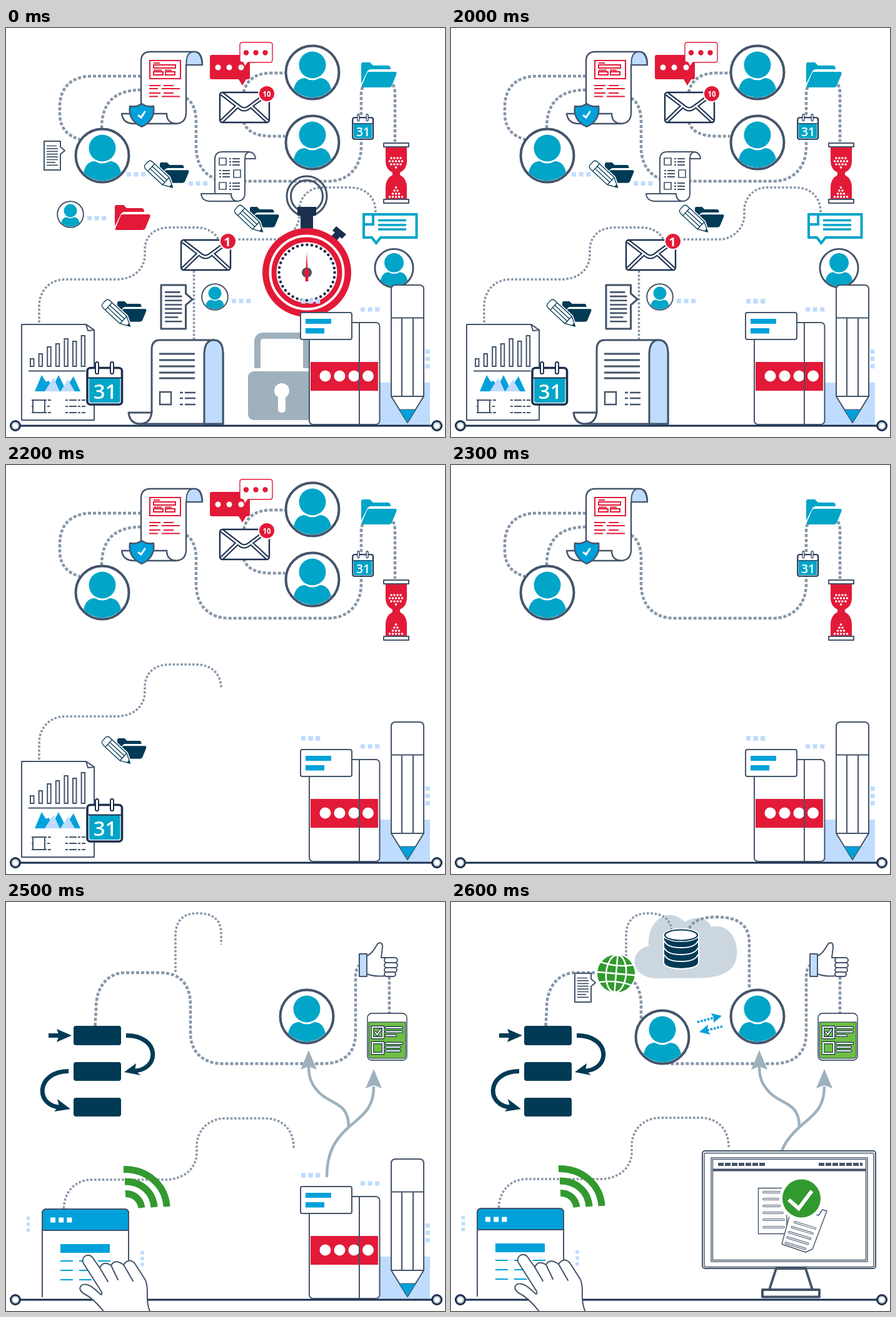
An HTML page that plays this animation: 702 px wide and 654 px high, repeating every 7.6 s.

```html
<!DOCTYPE html>
<html lang="en">
<head>
<meta charset="utf-8">
<title>Paperwork to digital</title>
<style>
html, body { margin: 0; width: 100%; height: 100%; overflow: hidden; background: #fff; }
svg { display: block; width: 100vw; height: 100vh; }
text { font-family: "Open Sans", sans-serif; text-anchor: middle; fill: #fff; }
.o { fill: #fff; stroke: #44546a; stroke-width: 2; stroke-linejoin: round; }
.n { fill: #fff; stroke: #1b2f4f; stroke-width: 2.4; stroke-linejoin: round; }
.l { fill: none; stroke: #44546a; stroke-width: 2; }
.w { fill: none; stroke: #fff; stroke-width: 2; stroke-linecap: round; }
.dot { fill: none; stroke: #8696a8; stroke-width: 4.5; stroke-dasharray: 5 3; }
.fine { stroke-width: 3.5; stroke-dasharray: 3.5 2.8; }
.sq { fill: none; stroke: #bfdcff; stroke-width: 7; stroke-dasharray: 7 4.6; }
.sm { stroke-width: 5.5; stroke-dasharray: 5.5 4; }
.red { fill: #e21a38; }
.redl { fill: none; stroke: #e21a38; stroke-width: 2; }
.teal { fill: #00a5c8; }
.blue { fill: #00a1db; }
.pale { fill: #bfdcff; }
.dark { fill: #003a55; }
.navy { fill: #1b2f4f; }
.gray { fill: #9eb1bd; }
.green { fill: #32992f; }
</style>
</head>
<body>
<svg viewBox="0 0 702 654">
<defs>
  <g id="person">
    <circle class="o" r="42.5" style="stroke-width:4"/>
    <circle class="teal" cy="-12" r="21.5"/>
    <path class="teal" d="M-30 27Q-26 9 -12 9Q0 16 12 9Q26 9 30 27A40.5 40.5 0 0 1 -30 27Z"/>
  </g>
  <g id="folder" fill="currentColor">
    <path d="M0 34V3Q0 0 3 0H14L19 5H43Q47 5 47 11H16Q11 11 9 16Z"/>
    <path d="M13 15H54Q58 15 56 20L49 37Q48 40 44 40H2Q0 40 1 37L9 18Q10 15 13 15Z"/>
  </g>
  <path id="pencil" d="M-1-8H35L50 0L35 8H-1Q-7 8-7 3V-3Q-7-8-1-8ZM35-8V8M3-8V8M3-2.5H35M3 2.5H35"/>
  <g id="edit">
    <use href="#folder" transform="translate(246 215) scale(.82)" color="#003a55"/>
    <g transform="translate(230 221) rotate(43)" fill="#fff" stroke-linejoin="round">
      <use href="#pencil" stroke="#fff" stroke-width="4.5"/>
      <use href="#pencil" stroke="#003a55" stroke-width="1.3"/>
      <path d="M45-2.500L50 0L45 2.500Z" class="dark"/>
    </g>
  </g>
  <g id="note">
    <path class="o" d="M0 0H26V9L33 15L26 21V46H0Z"/>
    <path class="l" style="stroke-width:1.7" d="M4 7.500H20M4 11.900H22M4 16.300H22M4 20.700H22M4 25.100H22M4 29.500H22M4 33.900H18M4 38.300H22"/>
  </g>
  <g id="calendar">
    <rect class="n" x=".5" y=".5" width="55.500" height="58.500" rx="5" style="stroke-width:3.6"/>
    <path class="teal" d="M3.500 17H53V53Q53 56 50 56H6.500Q3.500 56 3.500 53Z"/>
    <path d="M2 16.500H55" stroke="#1b2f4f" stroke-width="2"/>
    <rect class="n" x="13.500" y="-9" width="5" height="19" rx="2.5" style="stroke-width:2"/>
    <rect class="n" x="37.500" y="-9" width="5" height="19" rx="2.5" style="stroke-width:2"/>
    <text x="29" y="50" font-size="33" font-weight="600">31</text>
  </g>
  <path id="folds" d="M345 105L375 128Q381 132 387 128L418 105M345 149L370 125M418 149L392 125"/>
  <g id="envelope" fill="none">
    <rect class="n" x="342" y="103" width="79" height="48" rx="4"/>
    <use href="#folds" stroke="#1b2f4f" stroke-width="7"/>
    <use href="#folds" stroke="#fff" stroke-width="2.8"/>
    <circle class="red" cx="417" cy="105" r="13" stroke="#fff" stroke-width="2"/>
  </g>
  <path id="tasks" d="M595 200H612V217H595ZM595 225H612V242H595ZM617 201H642M617 207.5H642M617 213.5H632M617 226H642M617 232H639M617 238H639"/>
  <path id="tick" d="M599.5 208L602.5 212L608 204"/>
  <path id="rows" d="M500 464H526M500 475H526M500 486H526M500 497H530M500 508H532M500 520H532"/>
  <path id="tilted" d="M6-4H40M4 5H38M2 14H37M2 23H36M2 32H34"/>
</defs>

<!-- dotted routes -->
<path class="dot" data-on="0-5" d="M216 77H137C105 77 86 95 86 126V140Q88 170 118 178M216 99Q153 99 153 160M288 112Q304 122 304 150V190C304 225 325 245 357 245H515C548 245 568 222 568 190V105Q570 79 595 79Q622 79 622 105V182"/>
<path class="dot" data-on="0-3" d="M380 103Q387 72 425 72H446M380 150Q387 173 425 173H446"/>
<path class="dot fine" data-on="0-3" d="M53 471V445C53 420 70 402 95 402H175C205 402 222 385 222 362V355C222 335 235 319 262 319H303C330 319 344 335 344 358"/>
<path class="dot fine" data-on="0-1" d="M359 338H430C450 338 469 320 469 300V290C470 270 485 255 505 255H550C575 255 591 270 591 295"/>
<path class="dot fine" data-on="0-2" d="M300.5 388V498"/>

<!-- people, chat and mail -->
<use href="#person" x="154" y="204" data-on="0-5"/>
<g data-on="0-3">
  <use href="#person" x="490" y="71"/>
  <use href="#person" x="490" y="183"/>
  <path class="red" d="M329 43H387Q390 43 390 46V79Q390 82 387 82H384L378 92L372 82H329Q326 82 326 79V46Q326 43 329 43Z"/>
  <g fill="#fff"><circle cx="339" cy="63" r="4.5"/><circle cx="357" cy="63" r="4.5"/><circle cx="376" cy="63" r="4.5"/></g>
  <path d="M378 23H422Q426 23 426 27V51Q426 55 422 55H387L382 62L379 55H378Q374 55 374 51V27Q374 23 378 23Z" fill="#fff" stroke="#e21a38" stroke-width="1.4"/>
  <g class="red"><circle cx="384" cy="39.5" r="4.2"/><circle cx="399.5" cy="39.5" r="4.2"/><circle cx="414.5" cy="39.5" r="4.2"/></g>
  <use href="#envelope"/>
  <text x="417" y="109.5" font-size="11.5" font-weight="bold">10</text>
</g>

<!-- certified scroll -->
<g data-on="0-5">
  <path class="o" style="stroke-width:2.4" d="M301 38H231Q216 38 216 53V137H185Q187 153 205 153H272Q288 152 288 135V59H314Q314 38 301 38Z"/>
  <path class="o" style="fill:#bfdcff" d="M288.5 59V52Q290 38 301 38Q313 39 313.5 59Z"/>
  <path class="l" style="stroke-width:2.4" d="M205 137H257Q257 152 272 153"/>
  <path class="redl" d="M230 52H279V81H230ZM236 59H271V64H236ZM236 70H251V75H236ZM255 70H270V75H255ZM236 56H246M236 67.5H249M254 67.5H265"/>
  <path class="redl" d="M229 92H247M252 92H268M229 97H243M249 97H278M229 104H247M252 104H268M229 109.5H243M249 109.5H278"/>
  <path class="o" style="fill:#00a1db;stroke-width:2.4" d="M198 125Q209 127 217 121Q225 127 236 125Q239 148 217 158Q195 148 198 125Z"/>
  <path class="w" style="stroke-width:3" d="M212 140L216 143L222 134"/>
</g>

<g data-on="0-4">
  <use href="#folder" x="568" y="55" color="#00a5c8"/>
  <use href="#calendar" transform="translate(554 143) scale(.59)"/>
  <path class="red" d="M607 190H641V213Q641 226 630 231V235Q641 241 641 255V274H607V255Q607 241 618 235V231Q607 226 607 213Z"/>
  <path class="o" d="M604 184H644V190H604ZM604 274H644V280H604Z"/>
  <path class="w" style="stroke-width:3.6;stroke-dasharray:0 5" d="M616 208h16.1M613.5 213h20.1M616 218h16.1M623.5 223h.1M623.5 255h.1M621 260h5.1M618.5 265h10.1M613.5 270h20.1"/>
</g>

<!-- loose paperwork -->
<g data-on="0-0">
  <use href="#note" x="61" y="181"/>
  <use href="#person" transform="translate(103 298) scale(.49)"/>
  <path class="sq" d="M130 304h30.2"/>
  <use href="#folder" x="174" y="283" color="#e21a38"/>
</g>
<g data-on="0-2">
  <path class="sq" d="M193 234h30.2M292 248.5h30.2"/>
  <use href="#edit"/>
  <use href="#edit" x="144" y="71"/>
  <path class="o" d="M387 198H346Q334 198 334 210V265H312Q313 276 325 277H370Q382 276 382 264V209H399Q398 198 387 198Z"/>
  <path class="l" d="M382 209Q382 199 390 198M334 265H360Q360 276 370 277"/>
  <path class="l" style="stroke-width:1.7" d="M341 208H352V219H341ZM364 227H375V239H364ZM341 247H352V258H341Z"/>
  <path class="l" style="stroke-width:1.8;stroke-dasharray:3 2 12 9" d="M357 209h18M357 214h18M357 219h18M341 228h17M341 233h17M341 238h17M357 248h18M357 253h18M357 258h18"/>
  <use href="#envelope" x="-62" y="236"/>
  <text x="354" y="349" font-size="20" font-weight="bold">1</text>
</g>
<g data-on="0-1">
  <path d="M572 298H656.5V335H599L592 344L585 335H572ZM587 298V314H572" fill="#fff" stroke="#00a5c8" stroke-width="4"/>
  <path d="M595 307.5H640M595 315H640M595 322H640" stroke="#00a5c8" stroke-width="3.6"/>
  <use href="#person" transform="translate(620.5 384) scale(.72)"/>
</g>
<g data-on="0-2">
  <use href="#note" transform="translate(248 411) scale(1.52)"/>
  <use href="#person" transform="translate(334 430) scale(.49)"/>
  <path class="sq" d="M361 436.5h30.2"/>
  <path class="o" style="stroke-width:3" d="M332 499H246Q233 499 233 514V615H196Q198 633 215 633H347V520Q346 499 332 499Z"/>
  <path class="o" style="fill:#bfdcff;stroke-width:3" d="M317 633V520Q318 499 332 499Q347 499 347 520V633Z"/>
  <path class="l" style="stroke-width:3" d="M233 613Q232 632 215 633M245 521H302M245 531H302M245 541H302M245 551H302M245 560H302"/>
  <path class="l" style="stroke-width:2.4" d="M246 582H264V602H246Z"/>
  <path class="l" style="stroke-width:2.6;stroke-dasharray:5 3 20 9" d="M278 583h25M278 592h25M278 602h25"/>
</g>

<!-- report -->
<g data-on="0-3">
  <use href="#edit" x="-68" y="222"/>
  <path class="o" d="M25 474H128L141 483V627H25Z"/>
  <path class="o" d="M128 474L131 484L141 483Z"/>
  <g id="bars" class="l"></g>
  <path class="l" d="M36 548.5H127M43 595H62V615H43Z"/>
  <path class="l" style="stroke-width:1.8;stroke-dasharray:4 2 12 2" d="M41 595h31M41 605h1M66 605h6M41 615h31M95 595h32M95 605h32M95 615h32"/>
  <path class="blue" d="M46 581L57 555L64 566L68 564L75 573L84 555L94 575L97 581ZM92 581L108 557L119 581Z"/>
  <path class="pale" d="M62 581L76 559L86 581ZM87 581L99 562L110 581Z"/>
  <use href="#calendar" x="129.5" y="543"/>
</g>

<!-- padlock and stopwatch -->
<g data-on="0-0">
  <path d="M402 544V502Q402 492 412 492H470Q480 492 480 502V544" fill="none" stroke="#9eb1bd" stroke-width="10"/>
  <rect class="gray" x="387" y="549" width="110" height="78" rx="9"/>
  <circle cx="441" cy="580" r="12" fill="#fff"/><rect x="435" y="580" width="12" height="35" rx="5" fill="#fff"/>
  <g class="l" style="stroke-width:3"><circle cx="481" cy="269" r="32"/><circle cx="481" cy="269" r="25.5"/></g>
  <path class="navy" d="M466 286H496V300H491V322H471V300H466Z"/>
  <path class="navy" d="M528 317L544 330L537 337L534 334L527 342L519 334L526 327L522 324Z"/>
  <circle class="red" cx="481" cy="391" r="71"/>
  <circle class="w" cx="481" cy="391" r="58.5" style="stroke-width:4"/>
  <circle cx="481" cy="391" r="48.5" fill="#fff"/>
  <circle cx="481" cy="391" r="44.5" fill="none" stroke="#1b2f4f" stroke-width="4.6" stroke-linecap="round" stroke-dasharray="0 7.767"/>
  <circle cx="481" cy="391" r="8" fill="#44546a"/>
  <path class="red" d="M481 358L483.5 405H478.5Z"/><circle class="red" cx="481" cy="391" r="4.8"/>
</g>

<!-- password book, pencil and baseline -->
<g data-on="0-6">
  <path class="sq" d="M472 437h30.2M567 450h30.2M674 514v30.2"/>
  <rect class="pale" x="597" y="567" width="81" height="68"/>
</g>
<path d="M22 636H682" stroke="#1b2f4f" stroke-width="3"/>
<g class="n" style="stroke-width:3"><circle cx="15" cy="636" r="7.5"/><circle cx="689" cy="636" r="7.5"/></g>
<g stroke="#8696a8" fill="#fff"><circle cx="15" cy="636" r="5"/><circle cx="689" cy="636" r="5"/></g>
<g data-on="0-6">
  <rect class="o" x="485" y="471" width="112.5" height="163" rx="6"/>
  <rect class="red" x="487" y="534" width="108" height="46"/>
  <g fill="#fff"><circle cx="510.5" cy="556.5" r="9"/><circle cx="533.5" cy="556.5" r="9"/><circle cx="556.5" cy="556.5" r="9"/><circle cx="579" cy="556.5" r="9"/></g>
  <path class="l" d="M565 471V634"/>
  <rect class="o" x="471" y="455" width="82" height="43" rx="3"/>
  <path class="blue" d="M479 465H520V473H479ZM479 480H509V488.5H479Z"/>
  <path class="o" d="M616 589V418Q616 411 623 411H661Q668 411 668 418V589L642 631Z"/>
  <path class="l" d="M616 463.5H668M616 589H668M633 463V589M651 463V589"/>
  <path class="o" style="fill:#00a1db;stroke-width:1" d="M628.5 610H655.5L642 631Z"/>
  <path class="sq" d="M472 437h30.2"/>
</g>

<!-- digital side -->
<g data-on="6-7" data-shift="6:-9,0">
  <path data-on="7-7" fill="#ccd6de" d="M325 122C285 118 284 78 316 70C314 28 348 6 374 32C392 20 412 26 416 40C447 32 464 68 455 95Q446 120 402 121.500Z"/>
  <path class="dot" d="M151.5 198L153 170C153 135 172 113 200 113H255C290 113 304 135 304 165V210C304 240 325 258.5 355 258.5H515C545 258.5 568 245 568 210V122Q568 104 576 100M622 119V178"/>
  <path class="dot fine" d="M280 112V55Q280 18 315 18Q353 18 353 50V68"/>
  <path class="dot" data-on="7-7" d="M381 42Q390 24 425 24Q477 24 477 65V138"/>
  <g class="dark"><rect x="117" y="198" width="76" height="31" rx="4"/><rect x="117" y="256" width="76" height="30" rx="4"/><rect x="117" y="313" width="76" height="30" rx="4"/>
    <path d="M90 203L114 213.5L90 224L94 213.5ZM198 272L217 258L215 269L224 277ZM112 331L91 315L94 326L86 335Z"/></g>
  <path d="M77 213.5H95M201 213.5C256 213 256 270 212 270M109 270.5C55 271 56 328 97 328" fill="none" stroke="#003a55" stroke-width="7"/>
  <path d="M522 440C522 400 535 380 557 360C580 340 597 330 597 295M557 360C557 320 530 325 510 305C497 292 493 280 493 263" fill="none" stroke="#9eb1bd" stroke-width="4.5"/>
  <path class="gray" d="M493 237L506 268L493 263L480 268ZM597 267L610 298L597 293L584 298Z"/>
  <use href="#person" x="490" y="183"/>
  <path class="o" d="M586 86C596 83 600 70 604 66Q611 63 611 72L609 89H616V118Q598 120 586 115Z"/>
  <g class="o"><rect x="614" y="89" width="21" height="8" rx="4"/><rect x="614" y="97" width="21" height="8" rx="4"/><rect x="614" y="105" width="20" height="7.5" rx="3.7"/><rect x="614" y="112" width="18" height="7" rx="3.5"/></g>
  <rect class="o" style="fill:#bfdcff" x="574" y="83" width="12" height="36"/>
</g>
<g data-on="5-7" data-shift="5:2,2 6:-9,0">
  <rect class="n" style="stroke-width:1.3" x="587" y="178" width="63" height="75" rx="7"/>
  <path d="M589 192H648V246Q648 250 644 250H593Q589 250 589 246Z" fill="#6fbe44" stroke="#1b2f4f"/>
  <g fill="none" stroke-linecap="round">
    <use href="#tasks" stroke="#1b2f4f" stroke-width="4.4"/>
    <use href="#tasks" stroke="#fff" stroke-width="2.2"/>
    <use href="#tick" stroke="#1b2f4f" stroke-width="4"/>
    <use href="#tick" stroke="#fff" stroke-width="2"/>
  </g>
</g>

<g data-on="5-7" data-shift="5:16,3 6:16,1">
  <path class="dot fine" d="M76.5 489C77 465 92 443 122 443H238C268 443 289 425 289 400V390C289 362 310 345 335 345H398C425 345 444 362 444 392"/>
  <path d="M172 426.5C210 426 239 452 241 486M174 446C200 446 219 462 221 487M175 465.5C188 465 199 474 201 488" fill="none" stroke="#32992f" stroke-width="11"/>
  <path class="sq sm" d="M19.5 502v24.6M202 557v24.6"/>
  <path class="o" d="M42 631V497Q42 490 49 490H173Q180 490 180 497V631"/>
  <path class="o" style="fill:#00a1db" d="M42 524V497Q42 490 49 490H173Q180 490 180 497V524Z"/>
  <path d="M55 507.5h35" stroke="#fff" stroke-width="8" stroke-dasharray="8 5.2"/>
  <path class="blue" d="M71 546H150V560H71Z"/>
  <path d="M71 573h80M71 588h80M71 603h50" stroke="#00a1db" stroke-width="2.2" stroke-dasharray="20 10"/>
  <path class="o" d="M142 656C130 640 120 631 108 625C97 617 104 608 114 611C123 613 129 622 136 627Q139 626 136 621L108 577C103 567 115 559 122 567L134 584Q139 572 152 580Q158 569 172 579Q181 567 190 577L206 602Q210 608 210 625Q209 642 215 656Z"/>
  <path class="l" stroke-linecap="round" d="M134 584L147 606M152 580L163 603M172 579L187 605"/>
</g>

<g data-on="7-7">
  <g stroke="#fff" stroke-width="2">
    <path class="dark" d="M340 53V97Q342 106 368 107Q394 106 396 97V53Z"/>
    <path fill="none" d="M341 62Q345 73 368 73Q391 73 395 62M341 73Q345 84 368 84Q391 84 395 73M341 84Q345 95 368 95Q391 95 395 84"/>
    <ellipse cx="368" cy="53" rx="28" ry="10"/>
  </g>
  <ellipse cx="368" cy="53" rx="26" ry="8.5" fill="#fff" stroke="#003a55" stroke-width="2"/>
  <use href="#note" x="198" y="114"/>
  <g transform="translate(264 114.5) rotate(5)">
    <circle class="green" r="31" stroke="#fff" stroke-width="2"/>
    <path class="w" style="stroke-width:2.6" d="M0-30V30M-30 0H30M-25-16Q0-10 25-16M-25 16Q0 10 25 16"/>
    <ellipse class="w" style="stroke-width:2.6" rx="16" ry="30"/>
  </g>
  <use href="#person" x="338" y="216"/>
  <path d="M394 192L421 185M434 199L410 205" stroke="#00a1db" stroke-width="3.6" stroke-dasharray="3.5 2"/>
  <path class="blue" d="M433 182L416 178L420 185L420 193ZM397 208L411 196L410 205L415 212Z"/>

  <rect class="o" x="402" y="398" width="277" height="188" rx="4"/>
  <g class="l" style="stroke-width:1.4"><rect x="405" y="401.5" width="271" height="182" rx="2"/><rect x="416" y="409" width="250" height="166"/><rect x="418.5" y="411.5" width="245" height="161"/></g>
  <path class="l" style="stroke-width:4" d="M418 428.5H664"/>
  <path class="l" style="stroke-width:5;stroke-dasharray:9 2" d="M427 419.5H503M588 419.5H658"/>
  <path class="o" style="stroke-width:4" d="M520 586H567L578 620H509ZM498 620H589V631.5H498Z"/>
  <path class="o" style="stroke-width:1.4" d="M491.5 457.5H537V530.5H491.5Z"/>
  <g stroke-linecap="round">
    <use href="#rows" stroke="#44546a" stroke-width="3.6"/>
    <use href="#rows" stroke="#fff" stroke-width="1.6"/>
  </g>
  <path class="o" style="stroke-width:1.4" d="M545 488L588 501L594 492L601 494L578 555L567 560L529 547Z"/>
  <g transform="translate(543 514) rotate(17)" stroke-linecap="round">
    <use href="#tilted" stroke="#44546a" stroke-width="3.6"/>
    <use href="#tilted" stroke="#fff" stroke-width="1.6"/>
  </g>
  <circle class="green" cx="560.5" cy="474" r="33" stroke="#fff" stroke-width="5"/>
  <path d="M540 476L556 490L577 462" fill="none" stroke="#fff" stroke-width="6"/>
</g>
</svg>
<script>
const LOOP = 7600, HOLD = 2000, STEP = 100, LAST = 7;

document.getElementById("bars").innerHTML = [529, 521, 510, 505, 497, 501, 492]
  .map((top, i) => `<rect x="${39 + i * 13.6}" y="${top}" width="5.5" height="${541 - top}"/>`).join("");

const scenes = [...document.querySelectorAll("[data-on]")].map(el => {
  const [from, to] = el.dataset.on.split("-").map(Number);
  const shifts = Object.fromEntries((el.dataset.shift || "").split(" ").map(s => s.split(":")));
  return { el, from, to, shifts };
});

function draw(now) {
  const t = now % LOOP;
  const step = t < HOLD ? 0 : Math.min(LAST, Math.floor((t - HOLD) / STEP) + 1);
  for (const { el, from, to, shifts } of scenes) {
    el.style.display = step >= from && step <= to ? "" : "none";
    if (el.dataset.shift) el.setAttribute("transform", `translate(${shifts[step] || "0,0"})`);
  }
}

const start = performance.now();
function tick() {
  draw(performance.now() - start);
  requestAnimationFrame(tick);
}
tick();
</script>
</body>
</html>
```
